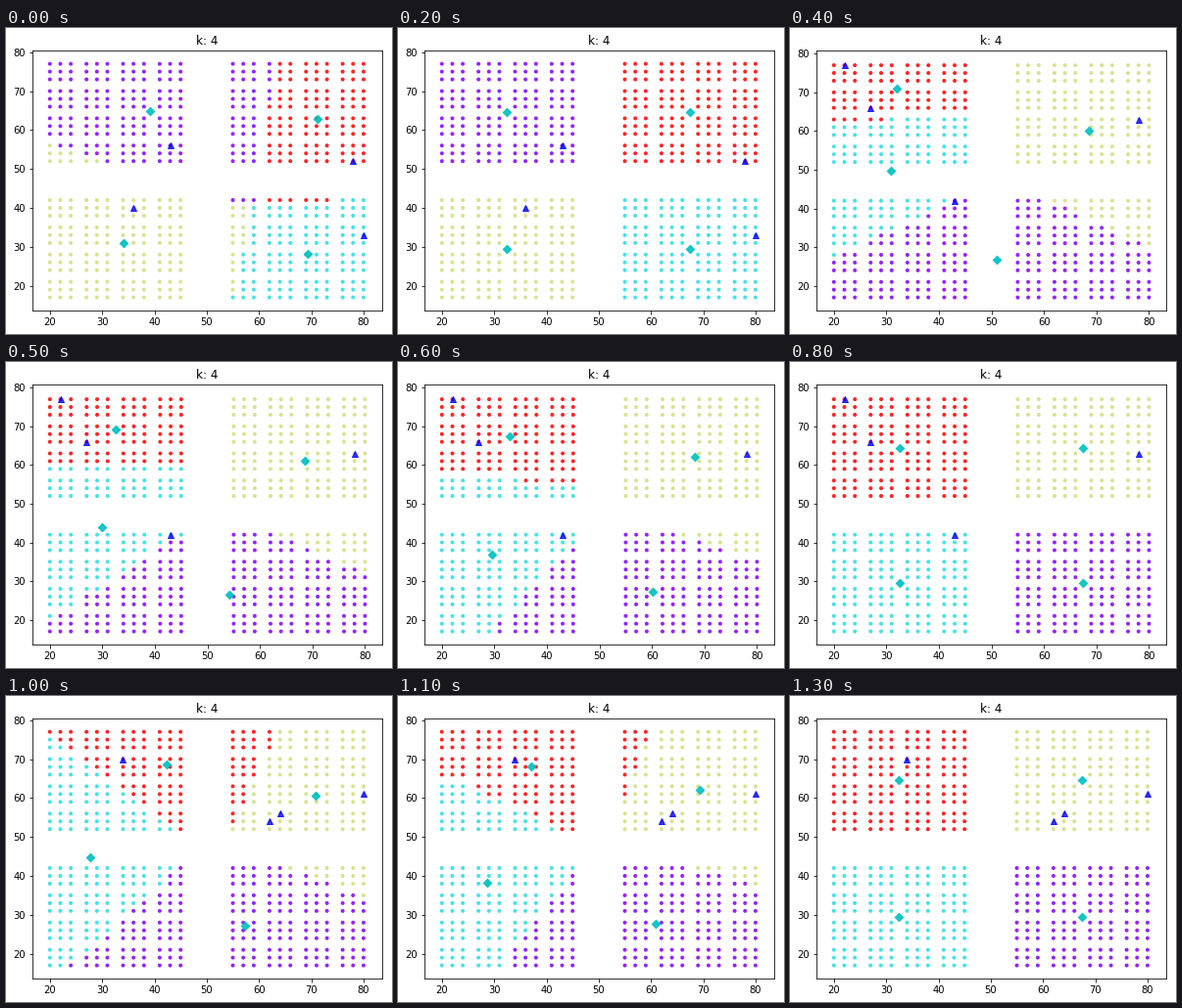
Write a matplotlib script that moves like this. It is 394 px wide and 313 px high and loops after 1500 ms.

```python
import numpy as np
import matplotlib.pyplot as plt
from matplotlib.animation import FuncAnimation

W, H, DPI = 394, 313, 72
AX_X, AX_Y, AX_W, AX_H = 27.05, 23.05, 357.12, 266.11  # pixels, from the top left
STEP = 100

plt.rcParams["font.family"] = "DejaVu Sans"

# Four blocks, each made of 4 x 4 clumps of 3 x 3 points
block = np.add.outer(7 * np.arange(4), [0, 2, 4]).ravel()
xs = np.concatenate([20 + block, 55 + block])
ys = np.concatenate([17 + block, 52 + block])
points = np.array([(x, y) for x in xs for y in ys], float)
colors = plt.get_cmap("rainbow")(np.linspace(0, 1, 4))

# Starting centres (purple, cyan, yellow, red) and how many steps are shown
RUNS = [
    ([(43, 56), (80, 33), (36, 40), (78, 52)], 3),
    ([(43, 42), (27, 66), (78, 63), (22, 77)], 5),
    ([(62, 54), (34, 70), (80, 61), (64, 56)], 4),
]


def kmeans(start):
    """All (labels, centres) states until the labels settle."""
    centers, labels, states = start, None, []
    while True:
        dist = ((points[:, None] - centers[None]) ** 2).sum(axis=2)
        new = dist.argmin(axis=1)
        if labels is not None and (new == labels).all():
            return states
        labels = new
        centers = np.array([points[labels == k].mean(axis=0) for k in range(4)])
        states.append((labels, centers))


def limits(lo, hi, lo_pad, hi_pad, size):
    """Data range widened by marker radii in pixels, plus a 5% margin."""
    unit = (hi - lo) * 1.11 / size
    lo, hi = lo - lo_pad * unit, hi + hi_pad * unit
    margin = 0.05 * (hi - lo)
    return lo - margin, hi + margin


def view(start):
    right = 3 if start[:, 0].max() == 80 else 1.5
    top = 3 if start[:, 1].max() == 77 else 1.5
    return limits(20, 80, 1.5, right, AX_W), limits(17, 77, 1.5, top, AX_H)


timeline = []
for seeds, shown in RUNS:
    seeds = np.array(seeds, float)
    states = kmeans(seeds)[-shown:]
    for labels, centers in states + states[-1:]:
        timeline.append((seeds, labels, centers))

# The tiny surplus guards against rounding down to a smaller canvas
fig = plt.figure(figsize=((W + 1e-6) / DPI, (H + 1e-6) / DPI), dpi=DPI, facecolor="white")
ax = fig.add_axes([AX_X / W, 1 - (AX_Y + AX_H) / H, AX_W / W, AX_H / H])
ax.set_title("k: 4")
ax.set_xticks(range(20, 81, 10))
ax.set_yticks(range(20, 81, 10))

dots = ax.scatter(points[:, 0], points[:, 1], s=36, marker=".", alpha=0.8)
means = ax.scatter([0] * 4, [0] * 4, s=36, marker="D", c="c", alpha=0.9)
starts = ax.scatter([0] * 4, [0] * 4, s=36, marker="^", c="b", alpha=0.8)


def draw(i):
    seeds, labels, centers = timeline[i % len(timeline)]
    xlim, ylim = view(seeds)
    ax.set_xlim(xlim)
    ax.set_ylim(ylim)
    dots.set_facecolor(colors[labels])
    dots.set_edgecolor(colors[labels])
    means.set_offsets(centers)
    starts.set_offsets(seeds)
    return dots, means, starts


anim = FuncAnimation(fig, draw, frames=len(timeline), init_func=lambda: draw(0),
                     interval=STEP, repeat=True, repeat_delay=0, blit=False)
plt.show()
```
